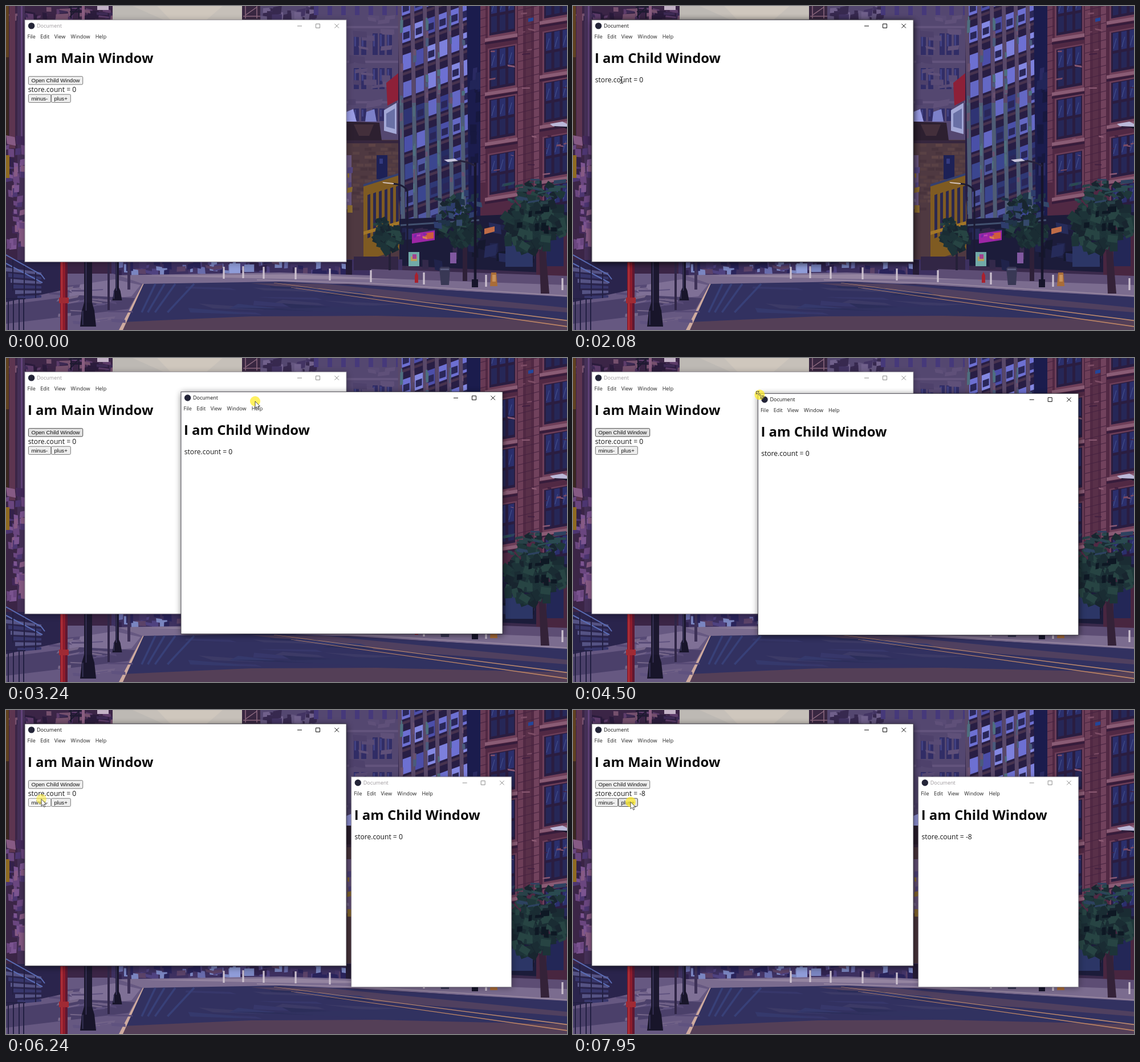
These frames come from a looping animation (984x569 px, 8 s). An HTML page:

```html
<!DOCTYPE html>
<html lang="en">
<head>
<meta charset="utf-8">
<title>Two windows, one store</title>
<style>
html, body { margin: 0; width: 100%; height: 100%; overflow: hidden; background: #3a2a4c; }
svg { display: block; width: 100%; height: 100%; }
text { font-family: "Open Sans", "Noto Sans", sans-serif; white-space: pre; }
.title, .menu { font-size: 9px; }
.menu { fill: #222; }
.h1 { font-size: 23.9px; font-weight: 700; fill: #0a0a0a; }
.count { font-size: 12.1px; fill: #151515; }
.btn { font: 9.65px "Liberation Sans", Arial, sans-serif; fill: #111; }
.shade { filter: blur(6px); }
</style>
</head>
<body>
<svg id="stage" viewBox="0 0 984 569" preserveAspectRatio="none">
  <g id="scene"></g>
  <g id="main"></g>
  <g id="child"></g>
  <g id="pointer">
    <circle id="halo" r="9" fill="#ffeb1e"/>
    <path id="arrow" d="M0 0V12.2L2.9 9.6 4.8 14 6.8 13.1 4.9 8.9H8.7Z" fill="#fff" stroke="#222" stroke-width=".8"/>
    <path id="beam" d="M-3-6Q0-6 0-4.5Q0-6 3-6M0-5V5M-3 6Q0 6 0 4.5Q0 6 3 6M-1.5 0H1.5" fill="none" stroke="#222"/>
    <path id="sizer" d="M-6-6H-1L-2.8-4.2 4.2 2.8 6 1V6H1L2.8 4.2-4.2-2.8-6-1Z" fill="#f3e36a" stroke="#333" stroke-width=".8"/>
  </g>
</svg>
<script>
const $ = id => document.getElementById(id);
const show = (el, on) => el.setAttribute('visibility', on ? 'inherit' : 'hidden');

// --- wallpaper ---
let art = '', seed = 11;
const rnd = () => (seed = seed * 16807 % 2147483647) / 2147483647;
const pick = list => list[Math.floor(rnd() * list.length)];
const poly = (c, p) => art += `<path d="M${p}Z" fill="${c}"/>`;
const box = (c, x, y, w, h) => poly(c, `${x} ${y}h${w}v${h}h${-w}`);
const line = (c, w, p) => art += `<path d="M${p}" fill="none" stroke="${c}" stroke-width="${w}"/>`;

// loose painted flecks inside a box
function flecks(n, x, y, w, h, fw, fh, colors) {
  for (let i = 0; i < n; i++) {
    const a = fw * (.4 + rnd()), b = fh * (.4 + rnd()), s = (rnd() - .5) * a * .5;
    poly(pick(colors), `${(x + rnd() * w).toFixed(1)} ${(y + rnd() * h).toFixed(1)}l${a.toFixed(1)} ${s.toFixed(1)} ${(s / 2).toFixed(1)} ${b.toFixed(1)} ${(-a).toFixed(1)} ${(-s).toFixed(1)}`);
  }
}

function leaves(x, y, rx, ry, n, size) {
  const greens = ['#1a2c33', '#1f373a', '#18252f', '#274443', '#1d3338'];
  for (let i = 0; i < n; i++) {
    const a = rnd() * 6.283, r = Math.sqrt(rnd()), s = size * (.5 + rnd() * .8), q = rnd() * 90;
    art += `<rect x="${-s / 2}" y="${-s / 2}" width="${s}" height="${s * .7}" fill="${pick(greens)}" transform="translate(${x + Math.cos(a) * r * rx} ${y + Math.sin(a) * r * ry}) rotate(${q})"/>`;
  }
}

function leftSide() {
  box('#3b2546', 0, 0, 190, 500);
  flecks(40, 0, 0, 185, 22, 16, 10, ['#4b3060', '#2b1c3c', '#5d3c6a', '#3d2a54', '#75506d']);
  box('#5d3550', 6, 0, 10, 250);
  box('#453057', 20, 0, 13, 450);
  box('#62437a', 26, 0, 3, 230);
  box('#60411f', 0, 0, 5, 90);
  box('#3a2720', 0, 90, 5, 140);
  flecks(45, 0, 225, 27, 205, 11, 14, ['#6a467f', '#43295a', '#7b5490', '#33214a', '#865a84', '#4d3671']);
  box('#8e6a21', 0, 262, 6, 40);
  box('#c3b2c6', 160, 0, 20, 7);
  line('#1e1a30', 2, '110 2H132M112 10H130M114 0V22M128 0V22M112 19l16-17');
  box('#8a5d80', 133, 0, 5, 24);
}

function skyAndTower() {
  poly('#c6c0b9', '187 0H416V26H187');
  poly('#bdb9b4', '187 0H222L280 26H187');
  poly('#cfc7bd', '265 0H380L350 26H290');
  box('#392741', 414, 0, 34, 26);
  line('#8d6a80', 1.5, '416 18H448M420 0V22M440 0V22M420 16l20-14');
  box('#544770', 446, 0, 246, 240);
  flecks(34, 446, 0, 90, 20, 14, 18, ['#433463', '#64567f', '#37294f', '#70608b']);
  for (let x = 540; x < 690; x += 24) box('#46397a', x, 0, 8, 16);
  for (const [y, h] of [[48, 38], [109, 37], [180, 22]]) {
    box('#62537c', 597, y - 13, 92, 4);
    for (const x of [610, 623, 643, 655, 668]) {
      box('#312d66', x, y, 9, h);
      box('#414182', x + 1, y + 2, 3, h * .55);
    }
  }
  flecks(22, 597, 10, 78, 180, 20, 9, ['#594b75', '#4e416b', '#5f5079']);
  poly('#9a9ce4', '597 186l12-5 6 22H597');
  poly('#7c80c8', '632 186l14-5 4 22H630');
  poly('#8d2038', '667 135l21-17v47l-19 10');
  poly('#a3a8d6', '663 183l22-13v55l-22-6');
  poly('#6970a5', '667 189l15-9v36l-15-4');
}

function brickHouse() {
  box('#4f3941', 597, 235, 93, 212);
  for (let y = 242, k = 0; y < 360; y += 7, k++)
    for (let x = 608 + k % 2 * 7; x < 682; x += 14)
      if (rnd() < .7) box(pick(['#594145', '#48333c', '#553d41', '#5e4446']), x, y, 12, 5);
  poly('#2d2030', '597 203l58 2 4 31H597');
  poly('#432f3b', '610 208h35l-8 20h-18');
  box('#36263d', 598, 236, 92, 5);
  box('#6a567f', 597, 262, 9, 95);
  flecks(8, 597, 260, 6, 90, 7, 11, ['#8d6d30', '#544681', '#7e6e92']);
  box('#1d2156', 650, 262, 19, 42);
  box('#343a80', 655, 268, 6, 9);
  poly('#7f5b22', '627 316l63-20v132l-63 20');
  poly('#35406f', '627 313l63-20v4l-63 20');
  for (let x = 634; x < 690; x += 10) poly('#2b2850', `${x} ${332 - (x - 634) * .3}l5-2v76l-5 2`);
  poly('#a27628', '627 396l62-18v6l-62 18');
}

function glassBlock() {
  poly('#281e44', '688 0H834V450H700L688 330');
  const slope = .36, bays = [694, 716, 737, 758, 779, 797], w = 15;
  for (let floor = 0; floor < 10; floor++) bays.forEach((x, i) => {
    const y = floor * 48 - 8 - (x - 690) * slope, lean = y * .02, drop = w * slope;
    const glass = y < 120 ? ['#6d70d2', '#8488e2', '#4c4ea9', '#7d80dc'] : y < 250 ? ['#4a50a8', '#6468c4', '#363b88', '#2f3474'] : ['#2f3875', '#3b468f', '#262c62', '#5058a2'];
    poly(pick(glass), `${x + lean} ${y}l${w}-${drop}v27l${-w} ${drop}`);
    if (rnd() < .55) poly('#2a2759', `${x + lean + 2} ${y + 9}l${w - 4}-${drop * .7}v12l${4 - w} ${drop * .7}`);
    poly('#47334f', `${x + lean} ${y + 31}l${w}-${drop}v5l${-w} ${drop}`);
  });
  poly('#1b1c4d', '808 0H834V395H812');
  flecks(12, 812, 20, 14, 340, 9, 24, ['#222558', '#17183f', '#2a2a62']);
  for (const x of [687, 709, 731, 752, 773, 794]) {
    poly('#594869', `${x} 0h7l3 170h-7`);
    poly('#4f5c75', `${x + 3} 170h7l3 205h-7`);
    flecks(10, x + 4, 10, 2, 355, 4, 16, ['#4e6f7f', '#69506f', '#4a5b7c']);
  }
}

function redBlock() {
  box('#512944', 832, 0, 152, 450);
  box('#673a55', 832, 0, 9, 310);
  box('#6d3e58', 898, 0, 9, 320);
  box('#593049', 912, 0, 9, 320);
  box('#71425d', 926, 0, 9, 320);
  for (let y = 8; y < 320; y += 15) line('#462340', 1.2, `832 ${y}l12-3M898 ${y}l37-9`);
  const bay = (x, y, w) => {
    poly('#6d3e58', `${x - 3} ${y}l${w + 6}-9v78l${-w - 6} 9`);
    poly('#2a1d40', `${x} ${y + 2}l${w}-8v70l${-w} 8`);
    for (let i = 0; i < 3; i++) {
      const px = x + 3 + i * w / 3, py = y + 3 - i * 2.7, pw = w / 3 - 5;
      poly('#2b2f6c', `${px} ${py}l${pw}-2v31l${-pw} 2`);
      poly('#262757', `${px} ${py + 36}l${pw}-2v28l${-pw} 2`);
      line('#475490', 1, `${px + 1} ${py + 27}l5-18`);
    }
    poly('#8a5c75', `${x - 8} ${y + 77}l${w + 12}-9v6l${-w - 12} 9`);
    poly('#361c3b', `${x - 8} ${y + 84}l${w + 12}-9v4l${-w - 12} 9`);
  };
  for (const y of [-20, 75, 163, 260]) { bay(848, y, 45); bay(944, y - 30, 44); }
  bay(944, 315, 44);
  flecks(22, 834, 0, 145, 300, 10, 2.5, ['#7c4c65', '#412040', '#8d5b74']);
  poly('#23469a', '916 22l9-2v6l-9 2');
}

function shops() {
  poly('#1c1c3a', '690 374L984 362V470L690 456');
  flecks(40, 692, 380, 286, 66, 15, 15, ['#20234a', '#15182e', '#262b59', '#33294a']);
  line('#42516f', 3, '692 385L830 376');
  poly('#9d26a6', '712 400l40-6v17l-40 6');
  poly('#d05b3d', '736 399l14-2v11l-14 2');
  flecks(6, 714, 399, 20, 7, 6, 4, ['#c043b4', '#7a28a8', '#d87b55']);
  poly('#c06c47', '839 391l18-4v9l-18 5');
  box('#72aaa8', 706, 432, 19, 25);
  box('#b89f5b', 710, 440, 11, 8);
  box('#a3418f', 713, 436, 7, 8);
  box('#8058a0', 779, 433, 11, 19);
  poly('#2c3666', '876 420l48-4v42h-48');
  poly('#482640', '930 372H984V480H930');
  box('#232757', 948, 402, 30, 55);
}

function distance() {
  box('#3d3060', 185, 445, 510, 40);
  flecks(70, 188, 444, 410, 22, 13, 12, ['#4f4280', '#30234f', '#686bab', '#5b4268', '#29235a', '#7a85c0', '#443568']);
  box('#8f9cd8', 392, 452, 19, 19);
  box('#251c36', 596, 446, 11, 28);
  box('#322645', 610, 440, 78, 24);
  poly('#7b6c8f', '188 473L480 468 984 484V512L600 488 240 489 186 500');
  poly('#9484a0', '240 474L500 471 700 480 480 479');
  poly('#5d4d74', '640 462L984 474V490L640 478');
  line('#9a8aa2', 1.5, '440 481L640 487 984 509');
}

function road() {
  poly('#323160', '240 488L480 484 620 490 984 511V569H197');
  poly('#543f57', '205 555L430 545 650 544 984 552V569H197');
  poly('#50405f', '430 487L560 488 984 530V538L640 511');
  for (let i = 0; i < 16; i++) {
    const x = 250 + rnd() * 330, y = 490 + rnd() * 44;
    poly(pick(['#35396c', '#37376a', '#2c2e5a', '#3c3a66']), `${x} ${y}l${60 + rnd() * 80} ${rnd() * 8} 12 4-90-3`);
  }
  for (const x of [262, 278, 297, 330]) line('#384078', 3.5, `${x} 488l-${24 + (x - 262) / 3} 50`);
  poly('#313260', '480 532L700 524 984 545V551L650 543');
  poly('#c08b6d', '470 486L984 551.5v1.8L470 486.6');
  poly('#c08766', '500 494L984 562v1.8L500 494.6');
  poly('#cfab9f', '239 488h2.5L205 569H197');
}

function leftStreet() {
  poly('#665881', '0 470L188 470 240 488 198 569H0');
  poly('#7f7096', '112 492L190 480 236 490 220 510 110 520');
  poly('#4b406a', '0 525L130 508 226 513 215 532 0 558');
  flecks(24, 70, 490, 120, 65, 32, 4, ['#766789', '#564975', '#706187', '#5f527f']);
  poly('#2a244c', '0 446H95V500L0 520');
  for (let i = 0; i < 6; i++) poly(i % 2 ? '#38376c' : '#555384', `${i * 4} ${459 + i * 10}L62 ${468 + i * 8}v4L${i * 4} ${466 + i * 10}`);
  line('#5a6cb4', 2, '0 437L62 472 68 480M0 452L64 486');
  line('#232043', 2, '12 446V500M32 456V510M52 468V513M0 514H34M4 514V569M13 514V569M23 514V569M31 514V569');
  box('#8d1c2c', 95, 449, 13, 120);
  box('#b5343a', 97, 449, 2, 120);
  box('#5f1731', 104, 449, 4, 120);
  poly('#a02a34', '93 512h17v10H93');
  for (const [x, w, y, b] of [[144, 14, 563, 28], [195, 6, 517, 17]]) {
    box('#1c182f', x - w / 2, 446, w, y - 446);
    poly('#18152a', `${x - b / 2} ${y}l3-${b} 4-${b / 2}h${b - 14}l4 ${b / 2} 3 ${b}`);
    line('#3d3860', 1.5, `${x - w / 4} 450V${y - b}M${x - b / 3} ${y - b}v${b - 3}`);
  }
  box('#302647', 178, 446, 4, 88);
  box('#3d3157', 213, 446, 5, 52);
}

function streetThings() {
  box('#252038', 671, 415, 4, 49);
  leaves(670, 408, 25, 24, 50, 13);
  leaves(658, 386, 14, 10, 12, 10);
  box('#2e2038', 801, 395, 8, 88);
  leaves(797, 398, 36, 26, 62, 14);
  leaves(786, 360, 34, 22, 30, 12);
  flecks(20, 750, 322, 72, 60, 11, 8, ['#2e3d6c', '#34486a', '#203348']);
  poly('#342238', '934 400h10l9 105h-15');
  leaves(930, 378, 54, 32, 95, 18);
  leaves(915, 412, 40, 22, 42, 16);
  leaves(932, 335, 42, 22, 36, 14);
  flecks(22, 868, 302, 95, 45, 16, 5, ['#2a4a50', '#284148', '#2d4260']);
  flecks(9, 880, 350, 80, 45, 12, 11, ['#0e1824']);
  line('#17152b', 4.5, '823 488V275');
  line('#26223c', 3, '823 281Q805 270 783 273');
  poly('#c9c6dd', '768 270l19-2 6 4-18 2');
  box('#17152b', 817, 480, 11, 14);
  line('#1c1b34', 3, '704 450V325Q698 313 678 312');
  poly('#d7c8c4', '660 309l20 2v2l-18-2');
  line('#17152b', 4, '984 214Q974 208 962 211');
  poly('#bbb8d8', '954 207l22-4 8 4v5l-25-1');
  for (const [x, y] of [[382, 458], [416, 457], [452, 458], [508, 459], [568, 461], [640, 464], [733, 468], [842, 472], [976, 478]])
    box('#cbc0ce', x - 1.6, y, 3.2, 21);
  poly('#a8212e', '717 486v-13l3-6 3 6v13');
  poly('#393855', '760 461l3-3h14l2 3-2 29h-14');
  box('#595a7c', 762, 461, 15, 3);
  poly('#a96c38', '851 468h9l2 24h-13');
  box('#c8915a', 853, 472, 6, 12);
}

[leftSide, skyAndTower, brickHouse, glassBlock, redBlock, shops, distance, road, leftStreet, streetThings].forEach(draw => draw());
$('scene').innerHTML = art;

// --- windows ---
const button = (id, x, y, w, h, label) =>
  `<rect id="${id}" x="${x}" y="${y}" width="${w}" height="${h}" rx="1.8"/><text class="btn" x="${x + 5}" y="${y + 10.6}">${label}</text>`;

function makeWindow(name, heading, countY, extra = '') {
  const g = $(name), menu = [['File', 4.5], ['Edit', 27.3], ['View', 51.7], ['Window', 80.6], ['Help', 123.7]];
  g.innerHTML = `<rect class="shade" x="1" y="2"/><rect class="frame" fill="#fff" stroke-width=".9"/>
    <circle cx="11.6" cy="10.6" r="5.7" fill="#242538"/><text class="title" x="21" y="13.8">Document</text>
    <path class="ctl" d="M-86 10.8h8M-53.5 7.2h7v7h-7zM-20.5 7l7.4 7.4M-13.1 7l-7.4 7.4" fill="none"/>
    <g class="body">${menu.map(([s, x]) => `<text class="menu" x="${x}" y="32.6">${s}</text>`).join('')}
    <text class="h1" x="5" y="75.7">${heading}</text>
    <text class="count" x="5.8" y="${countY}"></text>${extra}</g>`;
  const [shade, frame, title, ctl, body, count] = ['shade', 'frame', 'title', 'ctl', 'body', 'count'].map(c => g.querySelector('.' + c));
  return {
    body,
    set(x, y, w, h, active, value, zoom = 1, alpha = 1) {
      g.setAttribute('transform', `translate(${x + w / 2 * (1 - zoom)} ${y + h / 2 * (1 - zoom)}) scale(${zoom})`);
      g.setAttribute('opacity', alpha);
      for (const r of [shade, frame]) { r.setAttribute('width', w); r.setAttribute('height', h); }
      shade.setAttribute('opacity', active ? .6 : .35);
      frame.setAttribute('stroke', active ? '#44424c' : '#8d8993');
      title.setAttribute('fill', active ? '#111' : '#9c979b');
      ctl.setAttribute('stroke', active ? '#111' : '#8e8e8e');
      ctl.setAttribute('transform', `translate(${w} 0)`);
      count.textContent = 'store.count = ' + value;
    }
  };
}

const main = makeWindow('main', 'I am Main Window', 126.3,
  button('open', 6.4, 99.4, 95.3, 14.2, 'Open Child Window') +
  button('minus', 6.4, 130.9, 39.4, 14.2, 'minus-') +
  button('plus', 46.5, 130.9, 33.8, 14.2, 'plus+'));
const child = makeWindow('child', 'I am Child Window', 109.6);

function paint(id, hover, press) {
  $(id).setAttribute('fill', press ? '#f6f6f6' : hover ? '#e3e3e3' : '#efefef');
  $(id).setAttribute('stroke', press ? '#8d8d8d' : hover ? '#484848' : '#767676');
}

// --- motion ---
const W = 564, H = 425, HOME = [33, 24.3];
const clamp = v => Math.max(0, Math.min(1, v));
const ease = v => v < .5 ? 4 * v ** 3 : 1 - (2 - 2 * v) ** 3 / 2;
const span = (t, a, b) => ease(clamp((t - a) / (b - a)));
const mix = (a, b, k) => a + (b - a) * k;
const within = (t, a, b) => t >= a && t < b;

// start, end, x, y reached
const moves = [
  [240, 770, 78, 160], [880, 1070, 85, 130], [2440, 2600, 163, 36], [2620, 3240, 437, 76],
  [3339, 3340, 449, 78], [3450, 4280, 327, 64.5], [4450, 5150, 607, 118], [5320, 6000, 62, 156.5],
  [7260, 7400, 77, 134], [7540, 7950, 101, 161.5]
];

function pointerAt(t) {
  let x = 722, y = 524;
  for (const [a, b, nx, ny] of moves) {
    const k = span(t, a, b);
    x = mix(x, nx, k);
    y = mix(y, ny, k);
  }
  return [x, y];
}

function childBox(t) {
  if (t < 3340) {
    const k = span(t, 2620, 3240);
    return [mix(HOME[0], 307, k), mix(HOME[1], 59.4, k), W, H];
  }
  const k = span(t, 4450, 5150), x = mix(324, 605.7, k), y = mix(62.3, 117.2, k);
  return [x, y, 886.7 - x, 486.5 - y];
}

function render(t) {
  const clicks = t < 6300 ? 0 : Math.min(8, Math.floor((t - 6300) / 130) + 1);
  const value = clicks ? -clicks : 0;
  const tapping = within(t, 6240, 7210) && (t - 6240) % 130 < 60;
  const clickOpen = within(t, 1300, 1420);

  main.set(...HOME, W, H, within(t, 1630, 1710) || t >= 6240, value);
  show($('child'), t >= 1710);
  const k = 1 - (1 - clamp((t - 1700) / 190)) ** 3;
  child.set(...childBox(t), t < 6240, value, mix(.92, 1, k), k);
  show(child.body, t >= 1930);

  const [x, y] = pointerAt(t);
  const over = (l, u, r, d) => x > l && x < r && y > u && y < d;
  paint('open', within(t, 1000, 6240) || over(39, 123, 135, 138), clickOpen);
  paint('minus', over(39, 154, 79, 170), tapping);
  paint('plus', over(79.5, 154, 114, 170), false);

  show($('pointer'), t >= 290);
  $('pointer').setAttribute('transform', `translate(${x} ${y})`);
  const beam = within(t, 1930, 2520), sizer = within(t, 4330, 5350);
  show($('arrow'), !beam && !sizer);
  show($('beam'), beam);
  show($('sizer'), sizer);
  show($('halo'), !within(t, 1800, 2520));
  $('halo').setAttribute('opacity', tapping || clickOpen ? .5 : .7);
}

function tick(now) {
  render(now % 8000);
  requestAnimationFrame(tick);
}
render(0);
requestAnimationFrame(tick);
</script>
</body>
</html>
```
